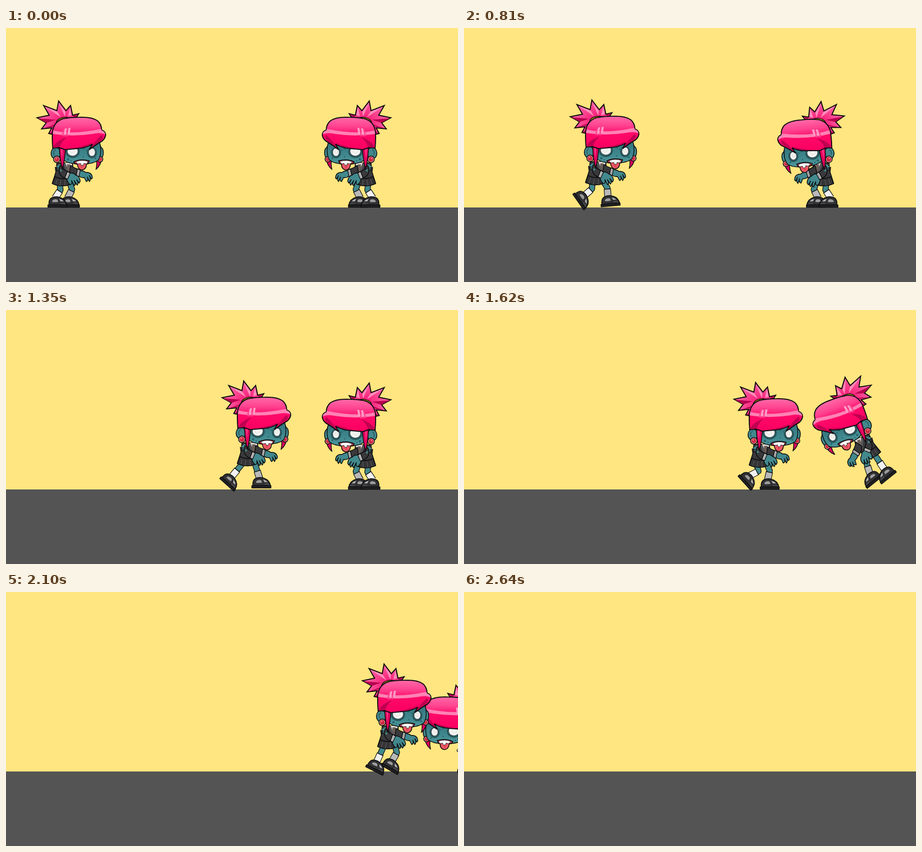
These frames come from a looping animation (889 by 501 pixels, 3000 ms). An HTML page:

```html
<!DOCTYPE html>
<html lang="en">
<head>
<meta charset="utf-8">
<title>Zombie bump</title>
<style>
html, body { margin: 0; width: 100%; height: 100%; overflow: hidden; background: #ffe680; }
svg { display: block; width: 100vw; height: 100vh; }
.ink { stroke: #0b0b0d; stroke-width: 1.5; stroke-linejoin: round; stroke-linecap: round; }
.bold { stroke: #0b0b0d; stroke-width: 2; stroke-linejoin: miter; }
.skin { fill: #42898d; }
.cloth { fill: #39393b; }
.line { fill: none; stroke-linecap: butt; stroke-linejoin: round; }
</style>
</head>
<body>
<svg id="stage" viewBox="0 0 889 501" preserveAspectRatio="none">
  <defs>
    <linearGradient id="hair" gradientUnits="userSpaceOnUse" x1="0" y1="176" x2="0" y2="238">
      <stop offset="0" stop-color="#ff6aa8"/>
      <stop offset=".3" stop-color="#ff428f"/>
      <stop offset=".55" stop-color="#ff0a68"/>
      <stop offset="1" stop-color="#fb0061"/>
    </linearGradient>
    <radialGradient id="tail" gradientUnits="userSpaceOnUse" cx="112" cy="186" r="50">
      <stop offset="0" stop-color="#f5126f"/>
      <stop offset="1" stop-color="#ff6ca9"/>
    </radialGradient>
    <linearGradient id="face" gradientUnits="userSpaceOnUse" x1="0" y1="232" x2="0" y2="268">
      <stop offset="0" stop-color="#357980"/>
      <stop offset="1" stop-color="#4a969a"/>
    </linearGradient>
  </defs>
  <rect width="889" height="501" fill="#ffe680"/>
  <rect y="354" width="889" height="147" fill="#545454"/>
</svg>
<script>
const NS = "http://www.w3.org/2000/svg";
const stage = document.getElementById("stage");

const leg = (name, sock) => `
  <g data-id="${name}">
    <path class="line" data-id="${name}Edge" stroke="#0b0b0d" stroke-width="12"/>
    <path class="line" data-id="${name}Skin" stroke="#42898d" stroke-width="9.4"/>
    <path class="line" data-id="${name}SockEdge" stroke="#0b0b0d" stroke-width="14"/>
    <path class="line" data-id="${name}Sock" stroke="${sock}" stroke-width="11.6"/>
    <g data-id="${name}Shoe">
      <path class="ink" fill="#303032" d="M-13 16Q-14 4-8 1Q0-3 8 0Q20 3 22 16Z"/>
      <path fill="#9c9c9c" d="M-6 6Q-1 2 4 5L5 9Q-2 10-7 9Z"/>
      <path fill="#b4b4b4" d="M7 3Q13 4 16 8L10 8Z"/>
      <path fill="#4b4b4e" d="M10 11Q16 9 20 13L19 14Q14 12 10 13Z"/>
      <path class="ink" fill="#242426" d="M-15 15H22.5V19.5H-15Z"/>
    </g>
  </g>`;

const torso = `
  <path class="ink cloth" d="M100 266L131 266Q133 282 126 297L124 308Q109 313 91 306Q95 294 98 284Z"/>
  <path class="skin" d="M99 273L106 268 110 280 104 284Z"/>
  <path fill="#1f1f21" d="M96 274L105 276 98 278 106 281 97 283Z"/>
  <path fill="#d9d9d5" d="M116 266L131 266 125 285Z"/>
  <path fill="#6d5f58" d="M120 269L126 269 127 281 124 286 120 280Z"/>
  <path fill="#555558" d="M112 267L117 267 124 286 122 290Z"/>
  <path class="ink" fill="#343436" d="M96 293Q110 300 126 295L125 309Q109 315 91 307Z"/>
  <path fill="none" stroke="#626266" d="M101 298L98 308M108 299L106 311M116 299L116 311"/>`;

const farArm = `
  <g data-id="farArm">
    <path class="ink skin" d="M144 281Q152 281 157 285Q166 284 169 291Q171 296 168 298L164 291
      Q168 299 164 303L160 294Q163 301 158 303L154 295Q148 296 143 292Z"/>
    <path class="ink cloth" d="M127 271Q134 276 143 279L140 293Q130 291 125 285Z"/>
    <path class="ink" fill="#e8e8e8" d="M141 278L146 280 143 294 138 292Z"/>
    <path stroke="#444" d="M143.5 280L140.5 292"/>
  </g>`;

const nearArm = `
  <g data-id="nearArm">
    <path class="ink skin" d="M122 287Q131 284 137 290Q145 292 146 302L144 306L139 299Q144 306 140 310L134 301
      Q139 309 134 311L129 301Q131 309 126 309Q120 303 119 296Z"/>
    <path class="ink cloth" d="M106 272Q111 271 113 279L124 285L119 297Q104 293 104 279Z"/>
    <path fill="#42898d" d="M106 278L111 281 107 284Z"/>
    <path class="ink" fill="#eee" d="M121 283L126 286 121 298 116 296Z"/>
    <path stroke="#444" d="M123.5 285L118.8 296.5"/>
  </g>`;

const ring = (x, r) => `
  <circle class="ink" cx="${x}" cy="259" r="${r}" fill="#e9b3ad"/>
  <circle cx="${x}" cy="259" r="${r - 1.8}" fill="#cf2640"/>
  <circle cx="${x - 1}" cy="257.5" r="1.4" fill="#f5848c"/>`;

const eye = (x, y, rx, ry) => `
  <ellipse cx="${x}" cy="${y + 1}" rx="${rx + 3.5}" ry="${ry + 3}" fill="#27565c"/>
  <ellipse cx="${x}" cy="${y}" rx="${rx}" ry="${ry}" fill="#f4f4f2" stroke="#39484a"/>
  <circle cx="${x - 1}" cy="${y - 1}" r="${rx * .45}" fill="none" stroke="#dededb"/>`;

const head = `
  <g data-id="head">
    <path class="bold" fill="url(#tail)" d="M61 177L85 172 74 153 100 163 103.500 144 118 163 127 153 131 172 143 169
      136 180 112 196 96 211 84 208 90 197 70 199 79 187Z"/>
    <path fill="#b80050" d="M63 178L98 181 80 187ZM73 198L103 188 90 195ZM86 207L104 194 96 210ZM132 173L141 170 134 179Z"/>
    <path fill="#ff8dbb" d="M76 155L101 165 108 176ZM104 148L117 165 116 175ZM126 156L129 172 122 174Z"/>
    <ellipse class="ink" cx="113" cy="184" rx="14" ry="7.500" fill="#ffd91c" transform="rotate(-12 113 184)"/>
    <path class="ink" fill="#d9005a" d="M181 225Q190 235 189 252Q188 270 177 279Q181 264 174 244Z"/>
    <ellipse class="ink skin" cx="187" cy="246" rx="4.500" ry="10"/>
    ${ring(185, 5.500)}
    <ellipse class="ink skin" cx="98" cy="247" rx="9.500" ry="11.500"/>
    <path fill="none" stroke="#24555a" stroke-width="1.500" d="M95 251Q91 243 98 240"/>
    <path class="ink" fill="url(#face)" d="M106 225L184 225Q190 246 182 260Q172 269 148 268Q122 269 112 259Q104 246 106 225Z"/>
    ${eye(131, 243, 10.500, 9.500)}
    ${eye(169, 245, 6.500, 8)}
    <g fill="#27616a">
      <circle cx="152" cy="237" r="2.400"/><circle cx="158" cy="241" r="1.300"/>
      <circle cx="122" cy="259" r="2.200"/><circle cx="128" cy="262" r="1.300"/>
      <circle cx="176" cy="257" r="1.700"/><circle cx="152" cy="254" r="1.200"/>
    </g>
    <path class="ink" fill="#b92f42" d="M133 264Q147 257 164 262L161 268Q149 271 136 268Z"/>
    <path class="ink" fill="#ee5664" d="M140 267L158 267Q159 279 149 280Q141 279 140 267Z"/>
    <path stroke="#b82d42" d="M149 270V276"/>
    <path fill="#fff" stroke="#222" stroke-width=".8" d="M137 264Q148 259 161 263L159 268 153 267 152 271 147 270 147 267 141 268Z"/>
    <path class="ink" fill="#e0005c" d="M105 228L117 230Q117 255 111 278Q105 260 105 228Z"/>
    <path fill="#ff3989" d="M108 235L112 236 110 260Z"/>
    ${ring(100, 6.500)}
    <path class="bold" fill="url(#hair)" d="M92 237Q90 213 92 201Q96 184 112 179Q126 176 145 176
      Q169 175 180 183Q188 190 188 201Q196 204 196 211Q195 218 189 223Q178 229 164 240
      Q167 234 170 229Q157 237 138 238L116 240 105 236Z"/>
    <path fill="#c00052" d="M93 235Q99 222 119 216Q108 225 106 235ZM119 238Q150 236 172 225Q160 235 139 237ZM168 235Q174 224 188 211Q192 216 188 221Z"/>
    <path fill="#ff82b4" d="M93 202Q130 211 187 199L188 202Q195 204 195 210Q186 205 170 209Q130 215 92 209Z"/>
    <path fill="#ff3e8c" d="M113 199L119 199 116 214 110 213ZM121 199L124 199 121 214 118 214Z"/>
    <path fill="#ff9cc4" d="M116 198L120 198 117 211 113 210ZM123 197L127 197 125 210 121 210Z"/>
  </g>`;

function makeGirl(flip) {
  const g = document.createElementNS(NS, "g");
  if (flip) g.setAttribute("transform", "matrix(-1 0 0 1 818 0)");
  g.innerHTML = `<g data-id="root"><g data-id="body">${leg("far", "#b9b9b9")}${leg("near", "#f1f1f1")}
    ${torso}${farArm}${nearArm}</g>${head}</g>`;
  stage.append(g);
  const parts = { g };
  g.querySelectorAll("[data-id]").forEach(n => parts[n.dataset.id] = n);
  return parts;
}

const right = makeGirl(true);
const left = makeGirl(false);

const clamp = v => Math.max(0, Math.min(1, v));

// Rows are [position, ...values]; values between rows are linear.
function at(rows, t) {
  let i = 0;
  while (i < rows.length - 2 && t >= rows[i + 1][0]) i++;
  const a = rows[i], b = rows[i + 1], k = clamp((t - a[0]) / (b[0] - a[0]));
  return a.slice(1).map((v, j) => v + (b[j + 1] - v) * k);
}

const turn = (node, deg, x, y) => node.setAttribute("transform", `rotate(${deg} ${x} ${y})`);

const HIPS = { near: [105, 302, 97.5], far: [124, 302, 122] };
const BONE = 17.5;

function setLeg(girl, name, [dx, dy, rot], lift) {
  const [hx, hy0, restX] = HIPS[name], hy = hy0 + lift;
  const ax = restX + dx, ay = 334 + dy;
  const vx = ax - hx, vy = ay - hy, d = Math.hypot(vx, vy);
  const bend = Math.sqrt(Math.max(0, BONE * BONE - d * d / 4));
  const kx = (hx + ax) / 2 + vy / d * bend, ky = (hy + ay) / 2 - vx / d * bend;
  const limb = `M${hx} ${hy}L${kx} ${ky}L${ax} ${ay}`;
  const mix = k => `${kx + (ax - kx) * k} ${ky + (ay - ky) * k}`;
  girl[name + "Edge"].setAttribute("d", limb);
  girl[name + "Skin"].setAttribute("d", limb);
  girl[name + "SockEdge"].setAttribute("d", `M${mix(.14)}L${mix(1.1)}`);
  girl[name + "Sock"].setAttribute("d", `M${mix(.22)}L${mix(1.1)}`);
  girl[name + "Shoe"].setAttribute("transform", `translate(${ax} ${ay}) rotate(${rot})`);
}

// Foot offset, foot angle; the far foot's last column is the body bob.
const NEAR = [[0, -17, -6, 42], [.04, -7, -5, 55], [.1, -4, -8, 48], [.3, 8, -8, 15],
  [.5, 13, -2, -5], [.78, 0, 0, 0], [.88, -8, 0, 27], [1, -17, -6, 42]];
const FAR = [[0, 12.5, -2.5, 0, -4], [.04, 13, -2, -5, -2], [.1, 5.5, 0, 0, -1], [.3, -4, 0, 5, -1],
  [.5, -15, -6, 45, -6], [.78, -15, -12, 60, 0], [.88, -2, -2, 30, -2], [1, 12.5, -2.5, 0, -4]];
const PHASE = [[240, 0], [480, .78], [810, 2.04], [1350, 4], [1620, 5.1], [2100, 6.88], [2640, 8.9]];
const WALK = [[240, 0], [360, 6], [480, 26], [600, 67], [750, 124], [810, 148], [1350, 364],
  [1620, 470], [1830, 543], [2100, 640], [2370, 731], [2640, 836]];

function drawLeft(t) {
  const phase = at(PHASE, t)[0] % 1, amp = clamp((t - 240) / 160);
  const near = at(NEAR, phase).map(v => v * amp);
  const far = at(FAR, phase).map(v => v * amp);
  const bob = far[3];
  left.g.setAttribute("transform", `translate(${at(WALK, t)[0]} ${bob})`);
  near[1] -= bob;
  far[1] -= bob;
  setLeg(left, "near", near, 0);
  setLeg(left, "far", far, 0);
}

// Head shift x and y, whole turn, extra body turn, arm turn, leg kick.
const KNOCK = [[1360, 0, 0, 0, 0, 0, 0], [1620, 63, -2, 21, 0, 24, 1], [1830, 118, 6, 14, 20, 20, 1],
  [2100, 194, 31, 0, 52, 10, 1], [2400, 282, 42, -4, 60, 10, 1]];

function drawRight(t) {
  const [x, y, rot, swing, arms, kick] = at(KNOCK, t);
  const nod = t > 240 && t < 1320 ? 3 * (1 - Math.cos((t - 240) / 1080 * 2 * Math.PI)) : 0;
  right.root.setAttribute("transform", `translate(${-x} ${y}) rotate(${rot} 143 215)`);
  turn(right.head, -0 + nod, 100, 262);
  turn(right.body, swing, 112, 268);
  turn(right.nearArm, nod + arms, 109, 276);
  turn(right.farArm, nod + arms, 128, 276);
  setLeg(right, "near", [-kick, 7 * kick, 18 * kick], 0);
  setLeg(right, "far", [4 * kick, 5 * kick, 18 * kick], 0);
}

function draw(now) {
  const t = Math.floor(now % 3000 / 30) * 30;
  const show = t < 2640 ? "inline" : "none";
  left.g.style.display = show;
  right.g.style.display = t < 2430 ? "inline" : "none";
  drawLeft(t);
  drawRight(t);
}

const start = performance.now();
function tick() {
  draw(performance.now() - start);
  requestAnimationFrame(tick);
}
tick();
</script>
</body>
</html>
```
